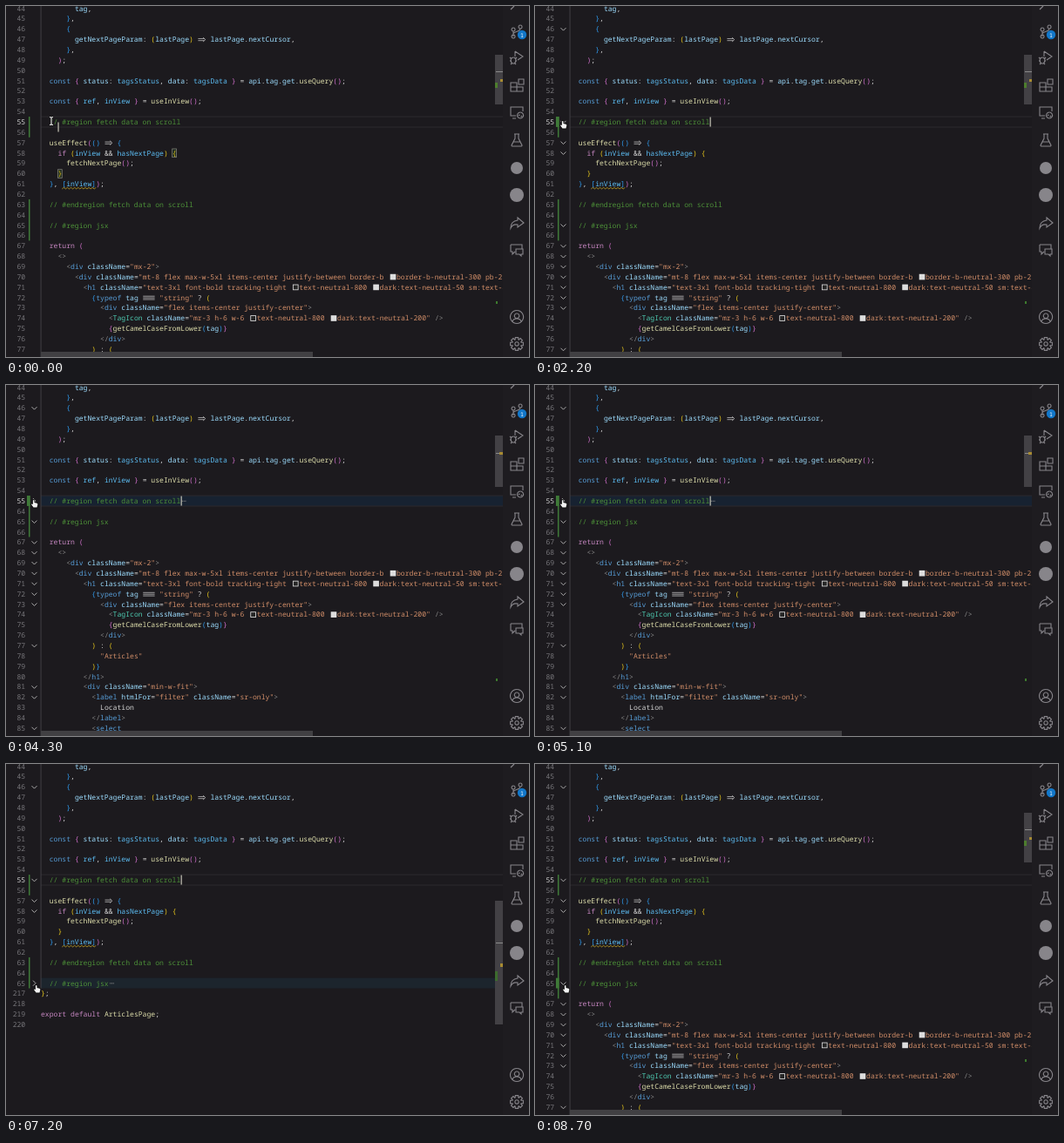
Write an HTML page with a canvas that moves like this. It is 600 px wide and 403 px high and loops after 8.8 s.

```html
<!DOCTYPE html>
<html lang="en">
<head>
<meta charset="utf-8">
<title>Folding code regions</title>
<style>
  html, body { margin: 0; width: 100%; height: 100%; overflow: hidden; background: #1c1a1e; }
  canvas { display: block; width: 600px; height: 403px; }
</style>
</head>
<body>
<canvas id="stage"></canvas>
<script>
const LOOP = 8800, CHAR = 4.86, ROW = 11.86, LEFT = 40, EDITOR_RIGHT = 570;
const FONT = '"Noto Sans Mono", "DejaVu Sans Mono", monospace';
const BG = '#1c1a1e';
const canvas = document.getElementById('stage');
const ctx = canvas.getContext('2d');
const dpr = window.devicePixelRatio || 1;
canvas.width = 600 * dpr;
canvas.height = 403 * dpr;

// ▢ and ■ are inline colour swatches, two columns wide
const source = `        tag,
      },
      {
        getNextPageParam: (lastPage) => lastPage.nextCursor,
      },
    );

  const { status: tagsStatus, data: tagsData } = api.tag.get.useQuery();

  const { ref, inView } = useInView();

  // #region fetch data on scroll

  useEffect(() => {
    if (inView && hasNextPage) {
      fetchNextPage();
    }
  }, [inView]);

  // #endregion fetch data on scroll

  // #region jsx

  return (
    <>
      <div className="mx-2">
        <div className="mt-8 flex max-w-5xl items-center justify-between border-b ■ border-b-neutral-300 pb-2
          <h1 className="text-3xl font-bold tracking-tight ▢ text-neutral-800 ■ dark:text-neutral-50 sm:text-4xl
            {typeof tag === "string" ? (
              <div className="flex items-center justify-center">
                <TagIcon className="mr-3 h-6 w-6 ▢ text-neutral-800 ■ dark:text-neutral-200" />
                {getCamelCaseFromLower(tag)}
              </div>
            ) : (
              "Articles"
            )}
          </h1>
          <div className="min-w-fit">
            <label htmlFor="filter" className="sr-only">
              Location
            </label>
            <select
              id="filter"`.split('\n');
const tail = ['};', '', 'export default ArticlesPage;', ''];

const BRACKETS = ['#e8c81c', '#cf6fca', '#2f9bee'];
const WORDS = {};
const colourWords = (colour, words) => words.split(' ').forEach(w => WORDS[w] = colour);
colourWords('#c586c0', 'if return export default');
colourWords('#569cd6', 'const typeof');
colourWords('#5cbcf2', 'tagsStatus tagsData ref inView hasNextPage');
colourWords('#dcdcaa', 'ArticlesPage');
colourWords('#d4d4d4', 'Location');

function tokenize(line, depth) {
  const tokens = [];
  const pattern = /(\/\/ .*)|("[^"]*"?)|(=>|===)|(<\/?|\/>|>)|([()[\]{}])|([A-Za-z]\w*)|\S/g;
  for (const m of line.matchAll(pattern)) {
    const [text, comment, string, ligature, angle, bracket, word] = m;
    const before = line.slice(0, m.index), after = line[m.index + text.length];
    let colour = '#d4d4d4';
    if (comment) colour = '#4c8f38';
    else if (string) colour = '#d08d68';
    else if (angle) colour = '#858585';
    else if (bracket) colour = BRACKETS[('([{'.includes(bracket) ? depth++ : --depth) % 3];
    else if (word) {
      if (/<\/?$/.test(before)) colour = /^[A-Z]/.test(word) ? '#4ec9b0' : '#569cd6';
      else colour = WORDS[word] || (after === '(' ? '#dcdcaa' : '#9cdcfe');
    }
    tokens.push({ text, colour, ligature, col: m.index });
  }
  return { tokens, depth };
}

const code = {};
function addLines(lines, first, depth) {
  lines.forEach((line, i) => {
    const result = tokenize(line, depth);
    depth = result.depth;
    code[first + i] = result.tokens;
  });
}
addLines(source, 44, 3);
addLines(tail, 217, 1);

const range = (a, b) => Array.from({ length: b - a + 1 }, (_, i) => a + i);
const VIEWS = {
  open: { lines: range(44, 78), thumb: [56, 113], bars: [[55, 56], [63, 66]],
    marks: [[562, 75, 8, 1, '#8b8b8b'], [567, 84, 3, 3, '#a78b32'], [561, 88, 3, 6, '#4d7d2e'], [562, 339, 2, 3, '#3d7a2e']] },
  scroll: { lines: [...range(44, 55), ...range(64, 86)], thumb: [58, 117], bars: [[55, 66]], folded: 55, foldBg: '#172231',
    marks: [[562, 78, 5, 1, '#8b8b8b'], [566, 77, 4, 3, '#a78b32'], [562, 337, 2, 3, '#3d7a2e']] },
  jsx: { lines: [...range(44, 65), ...range(217, 220)], thumb: [157, 299], bars: [[55, 56], [63, 65]], folded: 65, foldBg: '#1c252d',
    marks: [[562, 205, 8, 1, '#8b8b8b'], [567, 229, 3, 4, '#a78b32'], [561, 238, 3, 11, '#3d6b2e']] }
};
const FOLDABLE = [46, 55, 57, 58, 65, 67, 68, 69, 70, 71, 72, 73, 77, 81, 82, 85];

const clamp = v => Math.max(0, Math.min(1, v));
const rowY = i => 2.6 + i * ROW;
const colX = col => LEFT + col * CHAR;

function rect(x, y, w, h, colour) {
  ctx.fillStyle = colour;
  ctx.fillRect(x, y, w, h);
}
function stroke(points, colour, width = 0.8) {
  ctx.beginPath();
  points.forEach(([x, y]) => ctx.lineTo(x, y));
  ctx.strokeStyle = colour;
  ctx.lineWidth = width;
  ctx.stroke();
}
function text(str, x, y, colour, size = 8.1, align = 'left') {
  ctx.font = `${size}px ${FONT}`;
  ctx.textAlign = align;
  ctx.fillStyle = colour;
  ctx.fillText(str, x, y + 2.9);
}

function drawLigature(kind, x, y, colour) {
  const w = kind.length * CHAR;
  const gaps = kind === '=>' ? [-1.1, 1.1] : [-1.9, 0, 1.9];
  const end = kind === '=>' ? w - 2 : w - 0.6;
  gaps.forEach(d => stroke([[x + 0.6, y + 0.4 + d], [x + end, y + 0.4 + d]], colour, 0.7));
  if (kind === '=>') stroke([[x + w - 3.4, y - 2], [x + w - 0.8, y + 0.4], [x + w - 3.4, y + 2.8]], colour, 0.7);
}

function drawLine(n, y) {
  for (const { text: str, colour, ligature, col } of code[n]) {
    const x = colX(col);
    if (ligature) { drawLigature(ligature, x, y, colour); continue; }
    text(str.replace(/[▢■]/g, ' '), x, y, colour);
    for (const m of str.matchAll(/[▢■]/g)) {
      const sx = x + m.index * CHAR + 2.2;
      rect(sx, y - 3.2, 6.6, 6.6, '#e4e4e4');
      rect(sx + 0.8, y - 2.4, 5, 5, m[0] === '▢' ? '#262626' : '#dcdcdc');
    }
  }
}

function drawChevron(y, folded, alpha) {
  ctx.globalAlpha = folded ? 1 : alpha;
  const points = folded ? [[31, y - 3], [34, y], [31, y + 3]] : [[29.5, y - 1.2], [32.5, y + 1.8], [35.5, y - 1.2]];
  stroke(points, '#b9b9b9', 0.9);
  ctx.globalAlpha = 1;
}

function drawCaret(t) {
  let x = 200.6, y = rowY(11);
  if (t < 100) [x, y] = [59.5, 139];
  else if (t < 500) x = 54.6;
  ctx.globalAlpha = t < 600 ? 1 : clamp(0.5 + 2.5 * Math.sin((t / 1000 - 0.01) * 2 * Math.PI));
  rect(x, y - 5.5, 1.1, 11, '#d5d3c4');
  ctx.globalAlpha = 1;
}

function drawEditor(view, t) {
  ctx.save();
  ctx.beginPath();
  ctx.rect(0, 0, EDITOR_RIGHT, 403);
  ctx.clip();
  const indexOf = n => view.lines.indexOf(n);

  if (view.folded) rect(LEFT, rowY(indexOf(view.folded)) - 6, 530, ROW, view.foldBg);
  const current = rowY(11);
  [-6, 6].forEach(d => rect(LEFT, current + d - 0.5, 530, 1, '#2b292d'));
  rect(39.6, 0, 0.9, view === VIEWS.jsx ? rowY(22) - 6 : 403, '#454348');

  if (t < 100) {
    [[58, 31], [60, 4]].forEach(([n, col]) => {
      const x = colX(col), y = rowY(indexOf(n)) - 5;
      rect(x - 0.3, y, CHAR + 0.6, 10.4, '#8a8a80');
      rect(x + 0.4, y + 0.7, CHAR - 0.8, 9, '#1f2b20');
    });
  }

  for (const [a, b] of view.bars) {
    rect(26, rowY(indexOf(a)) - 6, 1.5, (indexOf(b) - indexOf(a) + 1) * ROW, '#3f7a38');
  }
  const hovered = t > 800 && t < 5500 ? 55 : t > 6400 ? 65 : 0;
  const thin = t > 3000 && t < 3400 || t > 6900 && t < 7600;
  if (hovered && !thin) rect(24, rowY(indexOf(hovered)) - 6, 3.6, ROW, '#3f7a38');

  const gutter = t < 5500 ? clamp((t - 700) / 500) : t < 6200 ? clamp((5900 - t) / 400) : clamp((t - 6200) / 400);
  view.lines.forEach((n, i) => {
    const y = rowY(i);
    text(n, 22.2, y, n === 55 ? '#d0d0d0' : '#77767a', 8.1, 'right');
    drawLine(n, y);
    if (FOLDABLE.includes(n)) drawChevron(y, n === view.folded, gutter);
    if (n === view.folded) {
      const x = colX(n === 55 ? 33 : 16) + 1.4;
      [0, 1.8, 3.6].forEach(d => rect(x + d, y - 0.3, 1.1, 1, '#8b8b8b'));
    }
    if (n === 61) {
      const points = range(0, 19).map(k => [colX(5) + k * 2.05, y + (k % 2 ? 4.2 : 5.8)]);
      stroke(points, '#b39523', 0.9);
    }
  });

  drawCaret(t);
  if (view !== VIEWS.jsx) rect(LEFT, 397, 312, 6, '#414043');
  rect(561, view.thumb[0], 9, view.thumb[1] - view.thumb[0], '#434145');
  view.marks.forEach(mark => rect(...mark));
  ctx.restore();
}

const ICONS = [
  [28, 'M-4-3a2 2 0 1 0 .1 0M-4 1V7M-4 5a2 2 0 1 0 .1 0M4-6a2 2 0 1 0 .1 0M4-2C4 2-4 1-4 4'],
  [59, 'M-2-7L7-1L1 3M-2-7V-1M-4 0a3 3.5 0 1 0 .1 0M-8 0l2 2M0 0l-2 2M-8 4h2M-2 4h2M-7 8l2-2M-1 8l-2-2'],
  [91, 'M-7-3H0V7H-7ZM-7 2H7V7H0M0 2V-3M2-7H8V-1H2Z'],
  [122, 'M-1 4H-7V-6H7V-1M-5 7H-1M4 0a3.5 3.5 0 1 0 .1 0M2 4l1.4-1.4M6 4L4.6 5.4'],
  [154, 'M-3-7H3M-2-7V-2L-6 6Q-6 7-5 7H5Q6 7 6 6L2-2V-7M-4 2H4'],
  [249, 'M1-6L8 0L1 5V2Q-5 1-7 6Q-7-2 1-3Z'],
  [280, 'M-7-6H6V-1M-7-6V2H-5V5L-2 2M-1-1H7V5H5V7L3 5H-1Z'],
  [357, 'M0-7.5a7.5 7.5 0 1 0 .1 0M0-4a2.8 2.8 0 1 0 .1 0M-5 5Q-4 2 0 2Q4 2 5 5'],
  [388, 'M0-2.2a2.2 2.2 0 1 0 .1 0' + range(0, 7).map(k => {
    const p = (r, d) => [r * Math.sin(k * Math.PI / 4 + d), -r * Math.cos(k * Math.PI / 4 + d)].map(v => v.toFixed(1)).join(' ');
    return `${k ? 'L' : 'M'}${p(5.3, -0.36)}L${p(7.6, -0.22)}L${p(7.6, 0.22)}L${p(5.3, 0.36)}`;
  }).join('') + 'Z']
].map(([y, d]) => [y, new Path2D(d)]);

function disc(x, y, r, colour) {
  ctx.beginPath();
  ctx.arc(x, y, r, 0, 7);
  ctx.fillStyle = colour;
  ctx.fill();
}

function drawActivityBar() {
  rect(570, 0, 30, 403, '#1e1c20');
  stroke([[579, 4], [583, 0]], '#87858a', 1.2);
  for (const [y, path] of ICONS) {
    ctx.save();
    ctx.translate(586, y);
    ctx.strokeStyle = '#87858a';
    ctx.lineWidth = 1.1;
    ctx.stroke(path);
    ctx.restore();
  }
  disc(586, 186, 7, '#87858a');
  disc(586, 217, 8, '#87858a');
  disc(592, 33, 5.2, '#1277c9');
  text('1', 592, 33, '#fff', 6.5, 'center');
}

const MOUSE = [[0, 52, 132], [400, 52, 132], [900, 32.5, 136], [5400, 32.5, 136], [5900, 53, 281],
  [6100, 53, 281], [6500, 35.5, 258], [LOOP, 35.5, 258]];
const HAND = new Path2D('M-1.6-3.6Q-.8-4.6 0-3.6V-1L3-.2Q4 .2 3.8 1.4L3 4.6H-1L-3.4 1.2Q-3.4 0-1.6 1Z');
const BEAM = new Path2D('M-2-4.5Q0-4.5 0-3.5Q0-4.5 2-4.5M0-3.5V3.5M-2 4.5Q0 4.5 0 3.5Q0 4.5 2 4.5');

function drawMouse(t) {
  const next = MOUSE.findIndex(k => k[0] > t);
  const [t0, x0, y0] = MOUSE[next - 1], [t1, x1, y1] = MOUSE[next];
  const p = (t - t0) / (t1 - t0), ease = p * p * (3 - 2 * p);
  const x = x0 + (x1 - x0) * ease, y = y0 + (y1 - y0) * ease;
  const overText = x > LEFT;
  ctx.save();
  ctx.translate(x, y);
  ctx.lineJoin = 'round';
  ctx.strokeStyle = '#111';
  ctx.lineWidth = overText ? 2.4 : 1.6;
  ctx.stroke(overText ? BEAM : HAND);
  ctx.strokeStyle = ctx.fillStyle = '#f2f2f2';
  ctx.lineWidth = 1.1;
  if (overText) ctx.stroke(BEAM);
  else ctx.fill(HAND);
  ctx.restore();
}

function draw(t) {
  const view = t >= 3400 && t < 5300 ? VIEWS.scroll : t >= 6700 && t < 7800 ? VIEWS.jsx : VIEWS.open;
  rect(0, 0, 600, 403, BG);
  drawEditor(view, t);
  drawActivityBar();
  drawMouse(t);
}

ctx.scale(dpr, dpr);
ctx.textRendering = 'geometricPrecision';
ctx.fontKerning = 'none';
const start = performance.now();
let shown = -1;
function tick() {
  const step = Math.floor((performance.now() - start) % LOOP / 100);
  if (step !== shown) draw(step * 100);
  shown = step;
  requestAnimationFrame(tick);
}
tick();
</script>
</body>
</html>
```
